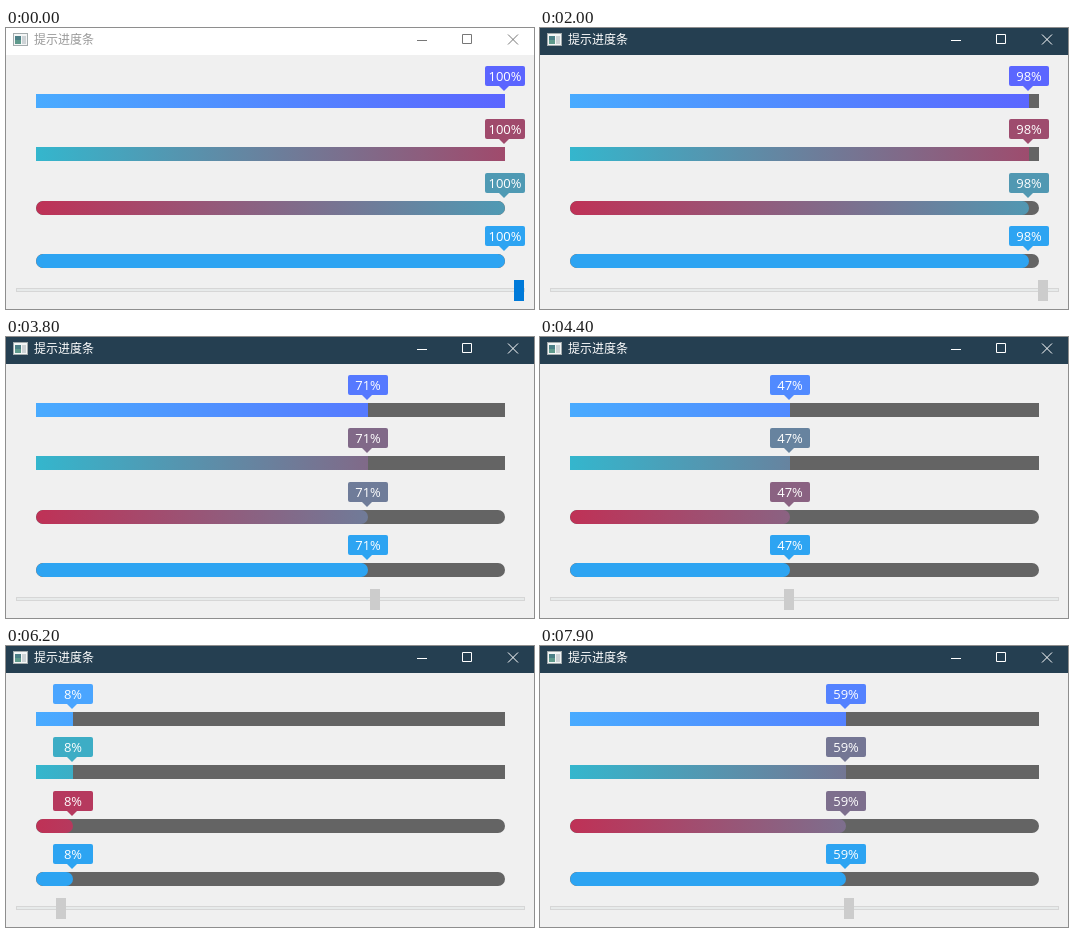
Write an HTML page that moves like this. It is 528x281 px and loops after 8 s.

```html
<!DOCTYPE html>
<html lang="zh-CN">
<head>
<meta charset="utf-8">
<title>提示进度条</title>
<style>
  html, body { margin: 0; width: 100%; height: 100%; overflow: hidden; background: #f0f0f0; }
  svg { display: block; width: 528px; height: 281px; }
  .caption { fill: #fff; }
  .title { font: 12px "Noto Sans CJK SC", "Noto Sans CJK", sans-serif; fill: #999; }
  .buttons { fill: none; stroke: #777; }
  .active .caption { fill: #253f51; }
  .active .title { fill: #fff; }
  .active .buttons { stroke: #fff; }
  .tip text { font: 13px "Open Sans", "Noto Sans", sans-serif; fill: #fff; text-anchor: middle; }
</style>
</head>
<body>
<svg id="window" viewBox="0 0 528 281">
  <defs id="defs"></defs>
  <rect width="528" height="281" fill="#f0f0f0"/>
  <rect class="caption" width="528" height="27"/>
  <g class="icon">
    <rect x="7" y="5" width="15" height="13" fill="#a3abad"/>
    <rect x="8" y="6" width="13" height="11" fill="#f4f6f6"/>
    <rect x="9" y="8" width="6" height="8" fill="#4b7f86"/>
    <rect x="9" y="12" width="6" height="4" fill="#5f9a8c"/>
    <rect x="16" y="8" width="4" height="8" fill="#cdd3d6"/>
  </g>
  <text class="title" x="28" y="16">提示进度条</text>
  <g class="buttons">
    <path d="M411 12.5H421M456.5 6.5H465.5V15.5H456.5Z"/>
    <path d="M502 6.5L512 16.5M512 6.5L502 16.5"/>
  </g>
  <g id="bars"></g>
  <rect x="10.5" y="260.5" width="508" height="3" fill="#e7eaea" stroke="#d6d6d6"/>
  <rect id="handle" y="252" width="10" height="21"/>
</svg>
<script>
const LOOP = 8000, STEP = 100, LEFT = 30, WIDTH = 469;
const PRESS = 1400, HOVER = 1200;

// Dragged slider value: [ms, percent], linear in between
const drag = [
  [0, 100], [1700, 100], [1800, 99], [1900, 99], [2000, 98], [2800, 87],
  [3100, 83], [3300, 83], [3400, 82], [3800, 71], [4200, 53], [5100, 26],
  [5800, 1], [5900, 1], [6000, 3], [6300, 11], [6400, 11], [6500, 5],
  [6600, 0], [7000, 0], [7100, 10], [7900, 59]
];

const rows = [
  { y: 66, radius: 0, from: [73, 171, 255], to: [91, 101, 255] },
  { y: 119, radius: 0, from: [52, 182, 205], to: [160, 74, 108] },
  { y: 173, radius: 7, from: [191, 49, 86], to: [79, 154, 180] },
  { y: 226, radius: 7, from: [45, 164, 242], to: [45, 164, 242] }
];

const byId = id => document.getElementById(id);
const rgb = c => `rgb(${c.map(Math.round)})`;
const mix = (a, b, k) => a.map((v, i) => v + (b[i] - v) * k);

rows.forEach((row, i) => {
  const box = `x="${LEFT}" y="${row.y}" height="14" rx="${row.radius}"`;
  byId('defs').innerHTML += `
    <linearGradient id="grad${i}" gradientUnits="userSpaceOnUse" x1="${LEFT}" x2="${LEFT + WIDTH}" y1="0" y2="0">
      <stop offset="0" stop-color="${rgb(row.from)}"/>
      <stop offset="1" stop-color="${rgb(row.to)}"/>
    </linearGradient>
    <clipPath id="clip${i}"><rect ${box} width="${WIDTH}"/></clipPath>`;
  byId('bars').innerHTML += `
    <rect ${box} width="${WIDTH}" fill="#646464"/>
    <g clip-path="url(#clip${i})"><rect class="fill" ${box} fill="url(#grad${i})"/></g>
    <g class="tip">
      <rect x="-20" width="40" height="20" rx="2"/>
      <path d="M-6.5 19.5H4.5L-1 25Z"/>
      <text y="15"></text>
    </g>`;
});

const fills = document.querySelectorAll('.fill');
const tips = document.querySelectorAll('.tip');

function valueAt(t) {
  const i = drag.findIndex(([time]) => time > t);
  if (i < 0) return drag[drag.length - 1][1];
  const [t0, v0] = drag[i - 1], [t1, v1] = drag[i];
  return Math.round(v0 + (v1 - v0) * (t - t0) / (t1 - t0));
}

function draw(t) {
  const value = valueAt(t);
  const length = Math.floor(WIDTH * value / 100);
  rows.forEach((row, i) => {
    fills[i].setAttribute('width', length);
    tips[i].setAttribute('transform', `translate(${LEFT + length} ${row.y - 28})`);
    tips[i].setAttribute('fill', rgb(mix(row.from, row.to, value / 100)));
    tips[i].lastElementChild.textContent = value + '%';
  });
  byId('window').classList.toggle('active', t >= PRESS);
  byId('handle').setAttribute('x', Math.round(10 + value * 4.98));
  byId('handle').setAttribute('fill', t >= PRESS ? '#ccc' : t >= HOVER ? '#171717' : '#007ad9');
}

function tick() {
  const t = performance.now() % LOOP;
  draw(t - t % STEP);
  requestAnimationFrame(tick);
}
tick();
</script>
</body>
</html>
```
